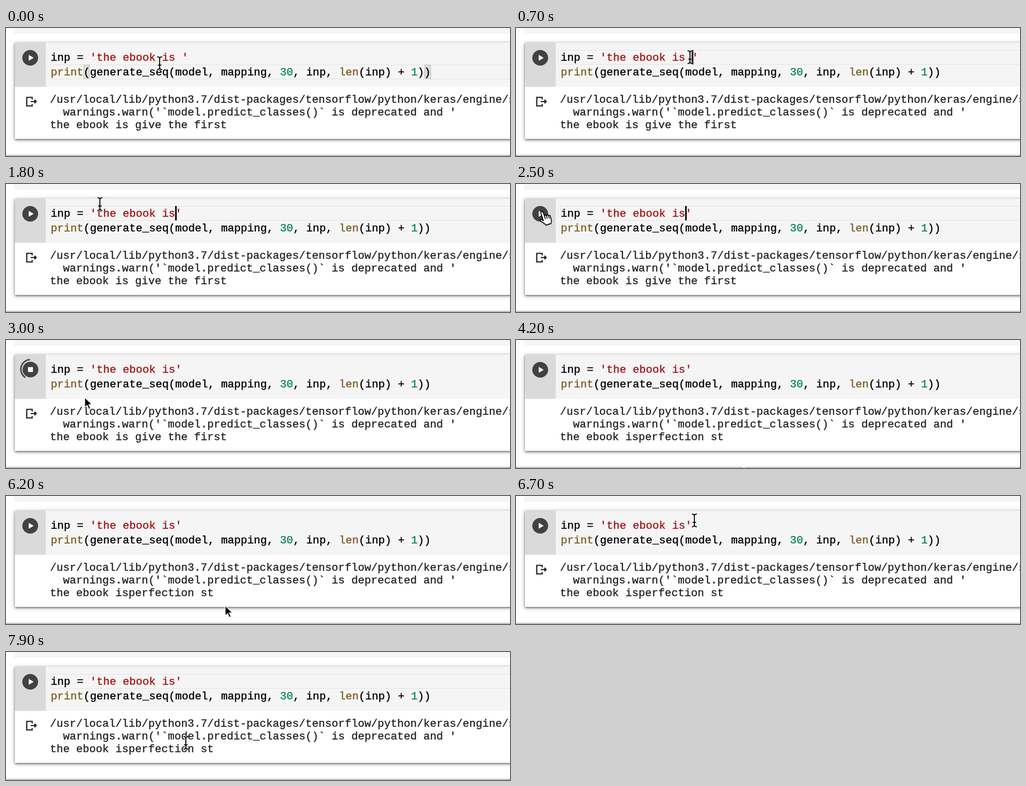
Write an HTML page that moves like this. It is 1020 px wide and 262 px high and loops after 8000 ms.

```html
<!DOCTYPE html>
<html lang="en">
<head>
<meta charset="utf-8">
<title>Notebook cell</title>
<style>
  html, body { margin: 0; width: 100%; height: 100%; overflow: hidden; background: #fff; }
  svg { display: block; width: 1020px; height: 262px; }
  text {
    font: 22.1px "Liberation Mono", "Courier New", monospace;
    white-space: pre;
    fill: #000;
    stroke: #000;
    stroke-width: .45px;
  }
  .out text { fill: #212121; stroke: #212121; stroke-width: .4px; }
  .str { fill: #a31515; stroke: #a31515; }
  .num { fill: #098658; stroke: #098658; }
  .fn { fill: #795e26; stroke: #795e26; }
  .card { filter: drop-shadow(0 2px 2px rgba(0, 0, 0, .5)) drop-shadow(0 1px 5px rgba(0, 0, 0, .22)); }
  .line { fill: none; stroke: #e2e2e2; }
  .match { fill: #dce0dc; stroke: #b9b9b9; }
  .icon { fill: none; stroke: #2a2a2a; stroke-width: 2.6; }
  .halo { fill: none; stroke: #fff; stroke-width: 4; }
  .stem { fill: none; stroke: #000; stroke-width: 2; }

  /* One 8 s clock; the small negative delay keeps ticks off the step edges. */
  .t { animation: 8s step-end -5ms infinite; }
  .line2 { animation-name: line2; }
  .line1 { animation-name: line1; }
  .quote { animation-name: quote; }
  .caret { animation-name: caret; }
  .idle { animation-name: idle; }
  .busy { animation-name: busy; }
  .toggle { animation-name: toggle; }
  .old { animation-name: old; }
  .new { animation-name: new; }
  .pointer { animation-name: move; }
  .ibeam { animation-name: ibeam; }
  .hand { animation-name: hand; }
  .arrow { animation-name: arrow; }
  .spin { transform-origin: 50px 60px; animation: spin 1s steps(10) -5ms infinite; }

  @keyframes line2 { 0% { visibility: visible } 8.75%, 100% { visibility: hidden } }
  @keyframes line1 {
    0%, 35% { visibility: hidden }
    8.75%, 90%, 100% { visibility: visible }
  }
  @keyframes quote { 0% { transform: none } 17.5%, 100% { transform: translateX(-13.26px) } }
  @keyframes caret {
    0% { visibility: hidden; transform: translateX(13.26px) }
    8.75% { visibility: visible; transform: translateX(13.26px) }
    15% { visibility: hidden; transform: translateX(13.26px) }
    17.5% { visibility: visible; transform: none }
    23.75% { visibility: hidden; transform: none }
    30% { visibility: visible; transform: none }
    35% { visibility: hidden; transform: none }
    90% { visibility: visible; transform: translateX(13.26px) }
    96.25%, 100% { visibility: hidden; transform: translateX(13.26px) }
  }
  @keyframes idle { 0%, 52.5%, 100% { visibility: visible } 35% { visibility: hidden } }
  @keyframes busy { 0%, 52.5%, 100% { visibility: hidden } 35% { visibility: visible } }
  @keyframes toggle { 0%, 78.75%, 100% { visibility: visible } 40% { visibility: hidden } }
  @keyframes old { 0% { visibility: visible } 40%, 100% { visibility: hidden } }
  @keyframes new { 0% { visibility: hidden } 51.25%, 100% { visibility: visible } }
  @keyframes ibeam {
    0%, 21.25%, 78.75%, 100% { visibility: visible }
    17.5%, 25% { visibility: hidden }
  }
  @keyframes hand { 0%, 37.5%, 100% { visibility: hidden } 25% { visibility: visible } }
  @keyframes arrow { 0%, 78.75%, 100% { visibility: hidden } 37.5% { visibility: visible } }
  @keyframes spin { from { transform: rotate(-144deg) } to { transform: rotate(216deg) } }

  /* The pointer advances in ticks of 100 ms. */
  @keyframes move {
    0% { transform: translate(311px, 72px); animation-timing-function: steps(8) }
    10% { transform: translate(358px, 58px) }
    11.25% { transform: translate(358px, 58px); animation-timing-function: steps(4) }
    16.25% { transform: translate(552px, 94px) }
    21.25% { transform: translate(262px, 34px) }
    22.5% { transform: translate(190px, 41px); animation-timing-function: steps(3) }
    26.25% { transform: translate(30px, 34px); animation-timing-function: steps(4) }
    31.25% { transform: translate(59px, 70px) }
    36.25% { transform: translate(59px, 70px); animation-timing-function: steps(4) }
    41.25% { transform: translate(460px, 259px) }
    76.25% { transform: translate(460px, 259px); animation-timing-function: steps(6) }
    83.75% { transform: translate(361px, 50px); animation-timing-function: steps(3) }
    87.5% { transform: translate(358px, 60px) }
    90% { transform: translate(358px, 60px); animation-timing-function: steps(7) }
    98.75%, 100% { transform: translate(364px, 186px) }
  }
</style>
</head>
<body>
<svg viewBox="0 0 1020 262">
  <defs>
    <path id="beam" d="M-5 -13Q0 -13 0 -9V9Q0 13 -5 13M5 -13Q0 -13 0 -9M5 13Q0 13 0 9M-3.5 4H3.5"/>
  </defs>

  <rect x="17" width="1003" height="10" fill="#f5f5f5"/>
  <path d="M17 10.5H1020" stroke="#ebebeb"/>
  <path d="M0 259.5H1020" stroke="#c8c8c8"/>
  <path d="M0 261.5H1020" stroke="#909090"/>

  <rect class="card" x="18" y="30" width="1030" height="197" fill="#fff"/>
  <rect x="80" y="30" width="940" height="90.5" fill="#f5f5f5"/>
  <rect x="18" y="30" width="62.5" height="90.5" fill="#dadada"/>

  <g class="t line2">
    <path class="line" d="M1020 75.5H90.5V104.5H1020"/>
    <rect class="match" x="157.5" y="75.5" width="11" height="28"/>
    <rect class="match" x="847.5" y="75.5" width="12" height="28"/>
  </g>
  <path class="t line1 line" d="M1020 45.5H90.5V74.5H1020"/>

  <text x="90.5" y="67">inp = <tspan class="str">'the ebook is</tspan></text>
  <text class="t quote str" x="355.7" y="67">'</text>
  <text x="90.5" y="97"><tspan class="fn">print</tspan>(generate_seq(model, mapping, <tspan class="num">30</tspan>, inp, <tspan class="fn">len</tspan>(inp) + <tspan class="num">1</tspan>))</text>
  <rect class="t caret" x="342.3" y="45" width="3.2" height="29.5"/>

  <g class="t idle">
    <circle cx="49" cy="61" r="16" fill="#424242"/>
    <path d="M46 55L56 61L46 67Z" fill="#fff"/>
  </g>
  <g class="t busy">
    <circle cx="49.5" cy="60.5" r="16" fill="#424242"/>
    <rect x="44.5" y="55.5" width="10" height="10" fill="#fff"/>
    <path class="spin" d="M49 40A20 20 0 0 1 63 75.2" fill="none" stroke="#424242" stroke-width="3"/>
  </g>

  <path class="t toggle icon" d="M53 146V142H42V159.5H53V155.5M50 150.5H61M57.5 147L61 150.5L57.5 154"/>
  <g class="out">
    <text x="89" y="153">/usr/local/lib/python3.7/dist-packages/tensorflow/python/keras/engine/s</text>
    <text x="89" y="179">  warnings.warn('`model.predict_classes()` is deprecated and '</text>
    <text class="t old" x="89" y="205">the ebook is give the first</text>
    <text class="t new" x="89" y="205">the ebook isperfection st</text>
  </g>

  <g class="t pointer">
    <g class="t ibeam">
      <use href="#beam" class="halo"/>
      <use href="#beam" class="stem"/>
    </g>
    <path class="t hand" fill="#fff" stroke="#000" stroke-width="1.8" stroke-linejoin="round" transform="rotate(-18)"
      d="M-5 4V-12Q-5 -15 -2.5 -15T0 -12V-4Q0 -6 2 -6T4 -3Q4 -5 6 -5T8 -2Q8 -4 10 -3T11 0V6Q11 10 8 14H-3Q-4 10 -9 5Q-12 1 -10 0Q-8 -1 -5 4ZM0 -4V2M4 -3V2M8 -2V3"/>
    <path class="t arrow" fill="#000" stroke="#fff" stroke-width="1.5"
      d="M0 0V21L5 16.5L8.5 24.5L12 23L8.5 15H15Z"/>
  </g>
</svg>
</body>
</html>
```
